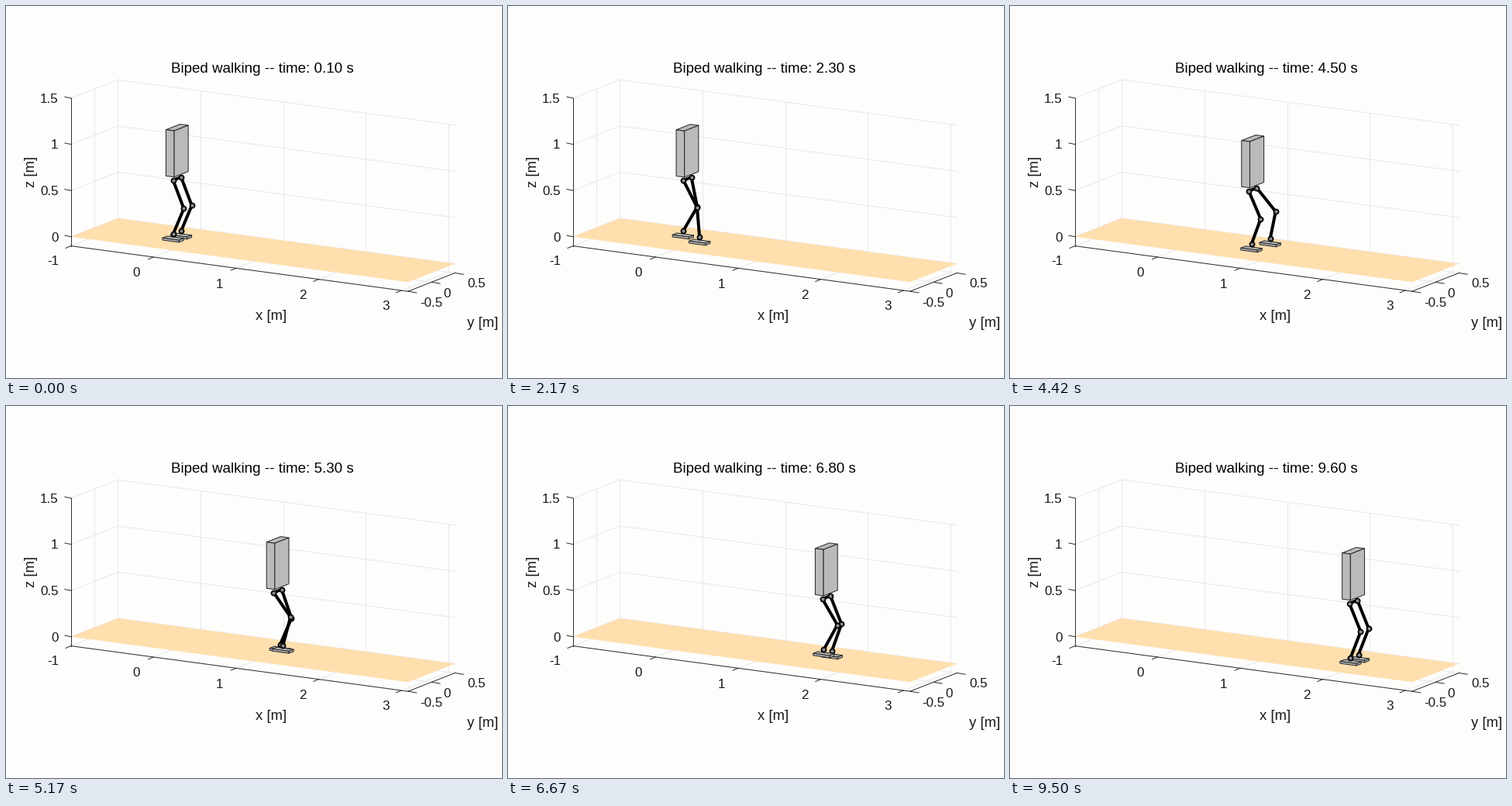
Recreate the animation shown at these times as a matplotlib script. Size 640 px wide and 480 px high, loop 9.58 s.

```python
import numpy as np
import matplotlib.pyplot as plt
from matplotlib.animation import FuncAnimation
from matplotlib.patches import Polygon

LOOP_MS, TICKS = 9580, 115
PX = 0.72                       # points per pixel at 100 dpi
PAPER, FLOOR, GRID = "#fdfdfb", "#ffdfae", "#e7e7ea"
AXIS, INK = "#303030", "#1a1a1a"
X0, X1, Y0, Y1, Z0, Z1 = -1, 3.08, -0.5, 0.5, -0.1, 1.5

STEP, STRIDE, STEPS, START = 0.8, 0.3, 8, 1.6
SWING, LIFT = 0.7, 0.05
HALF = 0.085                    # lateral offset of each leg
HIP_Z, ANKLE_Z, LINK = 0.65, 0.065, 0.32
TC, LAG = 0.28, 0.1             # pendulum time constant, body delay

plt.rcParams["font.family"] = "Liberation Sans"
fig = plt.figure(figsize=(6.4, 4.8), dpi=100, facecolor=PAPER)
ax = fig.add_axes([0, 0, 1, 1])
ax.set_xlim(0, 640)
ax.set_ylim(480, 0)
ax.axis("off")


def project(x, y, z):
    return (83.9 + 106.6 * (x + 1) + 60.5 * (y + 0.5),
            297.7 + 14.35 * (x + 1) - 23.7 * (y + 0.5) - 119.2 * z)


def segment(a, b, color, order):
    (xa, ya), (xb, yb) = project(*a), project(*b)
    ax.plot([xa, xb], [ya, yb], color=color, lw=PX, zorder=order)


def tick(p, dx, dy):
    x, y = project(*p)
    ax.plot([x, x + dx], [y, y + dy], color=AXIS, lw=PX, zorder=3)


def label(x, y, text, size=17, color=INK, **kw):
    return ax.text(x, y, text, fontsize=size * PX, color=color, va="baseline", **kw)


def draw_axes():
    for x in range(-1, 4):
        segment((x, Y1, Z0), (x, Y1, Z1), GRID, 1)
        segment((x, Y0, Z0), (x, Y1, Z0), GRID, 1)
        tick((x, Y0, Z0), -7, 2.8)
        label(61 + 107.3 * (x + 1), 334.5 + 14.5 * (x + 1), str(x), ha="center")
    for y in (-0.5, 0, 0.5):
        segment((X0, y, Z0), (X0, y, Z1), GRID, 1)
        segment((X0, y, Z0), (X1, y, Z0), GRID, 1)
        tick((X1, y, Z0), 11, 1.8)
    for x, base, text in ((548.5, 388, "-0.5"), (569, 376, "0"), (607, 363, "0.5")):
        label(x, base, text, ha="center")
    for z in (0, 0.5, 1, 1.5):
        segment((X0, Y0, z), (X0, Y1, z), GRID, 1)
        segment((X0, Y1, z), (X1, Y1, z), GRID, 1)
        tick((X0, Y0, z), -8, -1.6)
        label(67.5, 303.5 - 119.2 * z, f"{z:g}", ha="right")

    corners = [(X0, Y0), (X1, Y0), (X1, Y1), (X0, Y1)]
    ax.add_patch(Polygon([project(x, y, 0) for x, y in corners],
                         fc=FLOOR, ec="none", zorder=2))
    segment((X0, Y0, Z0), (X0, Y0, Z1), AXIS, 3)
    segment((X0, Y0, Z0), (X1, Y0, Z0), AXIS, 3)
    segment((X1, Y0, Z0), (X1, Y1, Z0), AXIS, 3)

    label(342, 405, "x [m]", 18.5, ha="center")
    label(615, 414, "y [m]", 18.5, ha="center")
    # Centred on its span, standing on the baseline x = 37
    ax.text(37, 214, "z [m]", fontsize=18.5 * PX, color=INK, rotation=90,
            rotation_mode="anchor", ha="center", va="baseline")


class Box:
    """Cuboid showing its top, front and side faces."""

    def __init__(self, size, color, order):
        self.size = size
        self.faces = [Polygon(np.zeros((4, 2)), fc=color, ec="#262626", lw=PX,
                              joinstyle="round", zorder=order) for _ in range(3)]
        for face in self.faces:
            ax.add_patch(face)

    def place(self, x, y, z):
        """Centre on x and y, with the bottom at z."""
        lx, ly, lz = self.size
        a, b = x - lx / 2, x + lx / 2
        c, d = y - ly / 2, y + ly / 2
        t = z + lz
        quads = ([(a, c, t), (b, c, t), (b, d, t), (a, d, t)],
                 [(a, c, z), (b, c, z), (b, c, t), (a, c, t)],
                 [(b, c, z), (b, d, z), (b, d, t), (b, c, t)])
        for face, quad in zip(self.faces, quads):
            face.set_xy([project(*p) for p in quad])


def shift(t, when):
    """Smooth pendulum response to a unit jump of the support point."""
    s = t - when
    return 1 - 0.5 * np.exp(-s / TC) if s > 0 else 0.5 * np.exp(s / TC)


def body(t):
    t -= LAG
    x = sum(STRIDE * shift(t, START + STEP * k) for k in range(1, STEPS))
    y = shift(t, START) + shift(t, START + STEP * STEPS)
    y += sum(2 * (-1) ** k * shift(t, START + STEP * k) for k in range(1, STEPS))
    return 0.993 * x, HALF * y


def foot(t, side):
    """Forward position and height; side -1 takes the first step."""
    x, z = 0.0, 0.0
    for k in range(0 if side < 0 else 1, STEPS, 2):
        u = (t - START - STEP * k - (STEP - SWING) / 2) / SWING
        if u <= 0:
            break
        u = min(u, 1)
        goal = STRIDE * min(k + 1, STEPS - 1)
        x += (goal - x) * (1 - np.cos(np.pi * u)) / 2
        z = LIFT * (1 - np.cos(2 * np.pi * u)) / 2
    return x, z


def knee(hip, ankle):
    """Forward-bent joint between two links of equal length."""
    leg = hip - ankle
    bend = np.sqrt(max(LINK ** 2 - leg @ leg / 4, 0))
    ahead = np.array([leg[2], 0, -leg[0]])
    return (hip + ankle) / 2 + bend * ahead / np.linalg.norm(ahead)


draw_axes()
title = label(213, 86.5, "", 18.75, "black", ha="left")
torso = Box((0.1, 0.3, 0.5), "#bababa", 5)
pelvis, = ax.plot([], [], color="black", lw=4 * PX, zorder=6)
feet, legs = {}, {}
for side, order in ((1, 7), (-1, 9)):
    feet[side] = Box((0.2, 0.1, 0.022), "#b6b6b6", order)
    legs[side], = ax.plot([], [], color="black", lw=4 * PX, marker="o", ms=6 * PX,
                          mfc="#8c8c8c", mec="black", mew=1.8 * PX, zorder=order + 1)


def update(i):
    t = 0.1 * (i + 1 - (i + 3) // 6)     # every sixth tick holds the pose
    title.set_text(f"Biped walking -- time: {t:.2f} s")
    bx, by = body(t)
    torso.place(bx, by, 0.703)
    hips = []
    for side in (1, -1):
        fx, fz = foot(t, side)
        y = side * HALF
        hip = np.array([bx, by + y, HIP_Z])
        ankle = np.array([fx, y, fz + ANKLE_Z])
        joints = [project(*p) for p in (hip, knee(hip, ankle), ankle)]
        legs[side].set_data(*zip(*joints))
        feet[side].place(fx, y, fz)
        hips.append(joints[0])
    pelvis.set_data(*zip(*hips))
    return []


anim = FuncAnimation(fig, update, frames=TICKS, interval=LOOP_MS / TICKS,
                     repeat=True, repeat_delay=0, blit=False)
plt.show()
```
